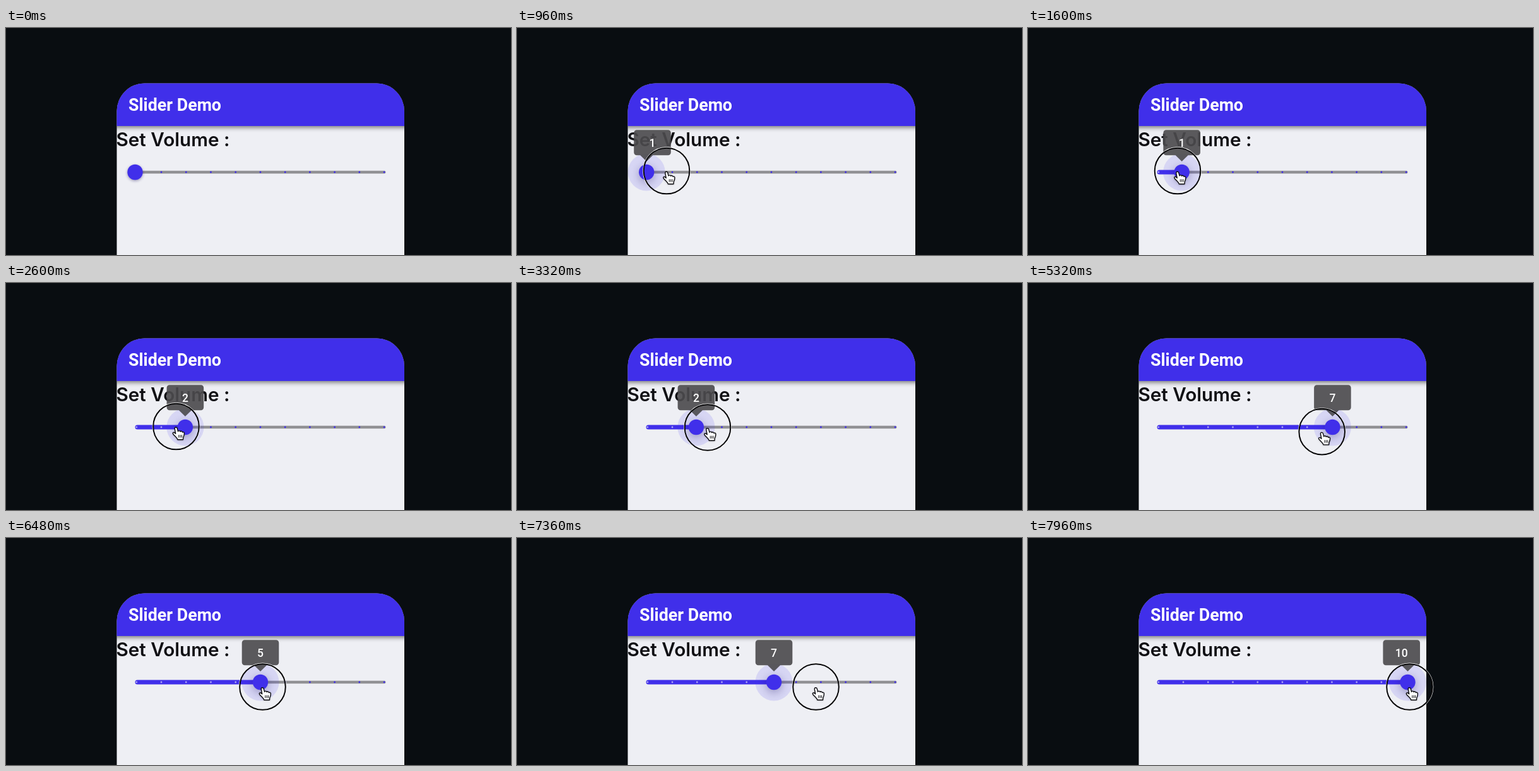
Write an HTML page with a canvas that moves like this. It is 800 by 359 pixels and loops after 8 s.

```html
<!DOCTYPE html>
<html lang="en">
<head>
<meta charset="utf-8">
<title>Slider Demo</title>
<style>
  html, body { margin: 0; width: 100%; height: 100%; overflow: hidden; background: #090d11; }
  canvas { display: block; width: 800px; height: 359px; }
</style>
</head>
<body>
<canvas id="stage"></canvas>
<script>
const LOOP = 8000, PRESS = 780;
const PURPLE = '#402fea', PAPER = '#eeeff4';
const TRACK_X = 204.5, TRACK_Y = 228, STEP = 39.7;

// Pointer path: time, x, y
const PATH = [
  [120, 455, 372], [740, 207, 227], [830, 207, 227], [960, 237, 226],
  [1640, 237, 226], [1900, 269.5, 227], [2650, 269.5, 227], [3250, 301, 228],
  [3330, 302, 228.5], [4015, 466, 231], [4160, 468.5, 232], [4700, 487, 234.5],
  [5080, 487, 235], [5780, 406.5, 235.5], [7070, 406.5, 235.5], [7806, 604.5, 235.5]
];

const stage = document.getElementById('stage');
const ctx = stage.getContext('2d');
const ratio = window.devicePixelRatio || 1;
stage.width = 800 * ratio;
stage.height = 359 * ratio;

const clamp = (v, lo = 0, hi = 1) => Math.min(hi, Math.max(lo, v));
const smooth = u => u * u * (3 - 2 * u);

function pointerAt(t) {
  const next = PATH.findIndex(key => key[0] > t);
  if (next === 0) return PATH[0].slice(1);
  if (next < 0) return PATH[PATH.length - 1].slice(1);
  const [t0, x0, y0] = PATH[next - 1], [t1, x1, y1] = PATH[next];
  const e = 0.5 - 0.5 * Math.cos(Math.PI * (t - t0) / (t1 - t0));
  return [x0 + (x1 - x0) * e, y0 + (y1 - y0) * e];
}

function valueAt(t) {
  if (t < PRESS) return 0;
  return clamp(Math.round((pointerAt(t)[0] - TRACK_X) / STEP), 0, 10);
}

// Each new value starts a glide from wherever the thumb is; short hops take longer.
const glides = [{ start: 0, from: 0, to: 0, length: 1 }];
const glideValue = (g, t) => g.from + (g.to - g.from) * smooth(clamp((t - g.start) / g.length));
for (let t = 0; t < LOOP; t += 2) {
  const last = glides[glides.length - 1], to = valueAt(t);
  if (to !== last.to) {
    const from = glideValue(last, t);
    glides.push({ start: t, from, to, length: 750 / Math.abs(to - from) });
  }
}

function thumbAt(t) {
  let current = glides[0];
  for (const g of glides) if (g.start <= t) current = g;
  return TRACK_X + STEP * glideValue(current, t);
}

function disc(x, y, r, fill) {
  ctx.beginPath();
  ctx.arc(x, y, r, 0, 2 * Math.PI);
  ctx.fillStyle = fill;
  ctx.fill();
}

function circle(x, y, r, width, color) {
  ctx.beginPath();
  ctx.arc(x, y, r, 0, 2 * Math.PI);
  ctx.lineWidth = width;
  ctx.strokeStyle = color;
  ctx.stroke();
}

function box(x, y, w, h, radii, fill) {
  ctx.beginPath();
  ctx.roundRect(x, y, w, h, radii);
  ctx.fillStyle = fill;
  ctx.fill();
}

function label(text, x, y, font, fill, align = 'left') {
  ctx.font = font;
  ctx.fillStyle = fill;
  ctx.textAlign = align;
  ctx.fillText(text, x, y);
}

function shadow(color, blur, dy) {
  ctx.shadowColor = color;
  ctx.shadowBlur = blur * ratio;
  ctx.shadowOffsetY = dy * ratio;
}
const noShadow = () => shadow('transparent', 0, 0);

function drawScreen() {
  ctx.fillStyle = '#090d11';
  ctx.fillRect(0, 0, 800, 359);
  ctx.save();
  ctx.beginPath();
  ctx.roundRect(175.5, 87.5, 455.5, 280, [44, 44, 0, 0]);
  ctx.clip();
  ctx.fillStyle = PAPER;
  ctx.fillRect(170, 80, 470, 290);
  shadow('rgba(0,0,0,.5)', 7, 2.5);
  ctx.fillStyle = PURPLE;
  ctx.fillRect(165, 70, 480, 85);
  ctx.restore();
  label('Slider Demo', 194, 131, '700 26.8px Roboto, sans-serif', '#fff');
  label('Set Volume :', 174.5, 187, '600 29.7px Inter, sans-serif', '#101014');
}

function drawSlider(thumb, press) {
  box(thumb, TRACK_Y - 2.3, 601.5 - thumb, 4.6, 2, '#919194');
  box(TRACK_X, TRACK_Y - 3.6, thumb - TRACK_X, 7.2, [3.6, 0, 0, 3.6], PURPLE);
  for (let i = 0; i <= 10; i++) {
    const x = 206.8 + 39.23 * i;
    disc(x, TRACK_Y, 1.4, x < thumb ? '#aaa3f2' : PURPLE);
  }
  if (press) disc(thumb, TRACK_Y, 29.5 * press, 'rgba(64,47,234,.13)');
  shadow(`rgba(20,10,90,${0.4 - 0.08 * press})`, 4 + 10 * press, 1.5 + 2.5 * press);
  disc(thumb, TRACK_Y, 12.2, PURPLE);
  noShadow();
}

function drawBubble(thumb, value, scale) {
  if (!scale) return;
  const middle = clamp(thumb, 214.5, 591.7) - thumb;
  ctx.save();
  ctx.translate(thumb, 211);
  ctx.scale(scale, scale);
  ctx.beginPath();
  ctx.roundRect(middle - 29.3, -49.7, 58.6, 40, 4.5);
  ctx.moveTo(-10, -9.7);
  ctx.lineTo(10, -9.7);
  ctx.lineTo(0, 0);
  ctx.closePath();
  ctx.fillStyle = 'rgba(76,75,77,.91)';
  ctx.fill();
  label(value, middle, -23.4, '500 17.5px Roboto, sans-serif', '#fff', 'center');
  ctx.restore();
}

const hand = new Path2D('M-2.2 2.5C-2.8-.3 1-.9 1.8 1.8L3 6.5C3.5 5 6 5 6.6 6.9 7.3 5.6 9.6 6 10 7.9 ' +
  '10.8 7 13 7.4 12.9 9.6 12.9 13 12 14 11.2 16L11 19.5H2.3C2 17-2 14-4.5 11-6.5 8.5-3.8 7.3-2.2 8.7L-.8 10Z');
const creases = new Path2D('M4.3 12V16.3M6.7 12V16.3M9 12V16.3');

function drawPointer(x, y, ring) {
  if (ring) {
    circle(x, y, 37 * ring, 1.8, '#fff');
    circle(x, y, 36.3 * ring, 2, '#060608');
  }
  ctx.save();
  ctx.translate(x, y + 1.2);
  shadow('rgba(0,0,0,.3)', 3, 1);
  ctx.fillStyle = '#fff';
  ctx.fill(hand);
  noShadow();
  ctx.strokeStyle = '#0c0c10';
  ctx.lineWidth = 1.4;
  ctx.lineJoin = 'round';
  ctx.stroke(hand);
  ctx.lineWidth = 1;
  ctx.stroke(creases);
  ctx.restore();
}

function draw(now) {
  const t = now % LOOP;
  const thumb = thumbAt(t);
  const press = smooth(clamp((t - PRESS) / 110));
  ctx.setTransform(ratio, 0, 0, ratio, 0, 0);
  drawScreen();
  drawSlider(thumb, press);
  drawBubble(thumb, valueAt(t), press);
  if (t > PATH[0][0]) drawPointer(...pointerAt(t), press);
}

const began = performance.now();
function tick() {
  draw(performance.now() - began);
  requestAnimationFrame(tick);
}
tick();
</script>
</body>
</html>
```
